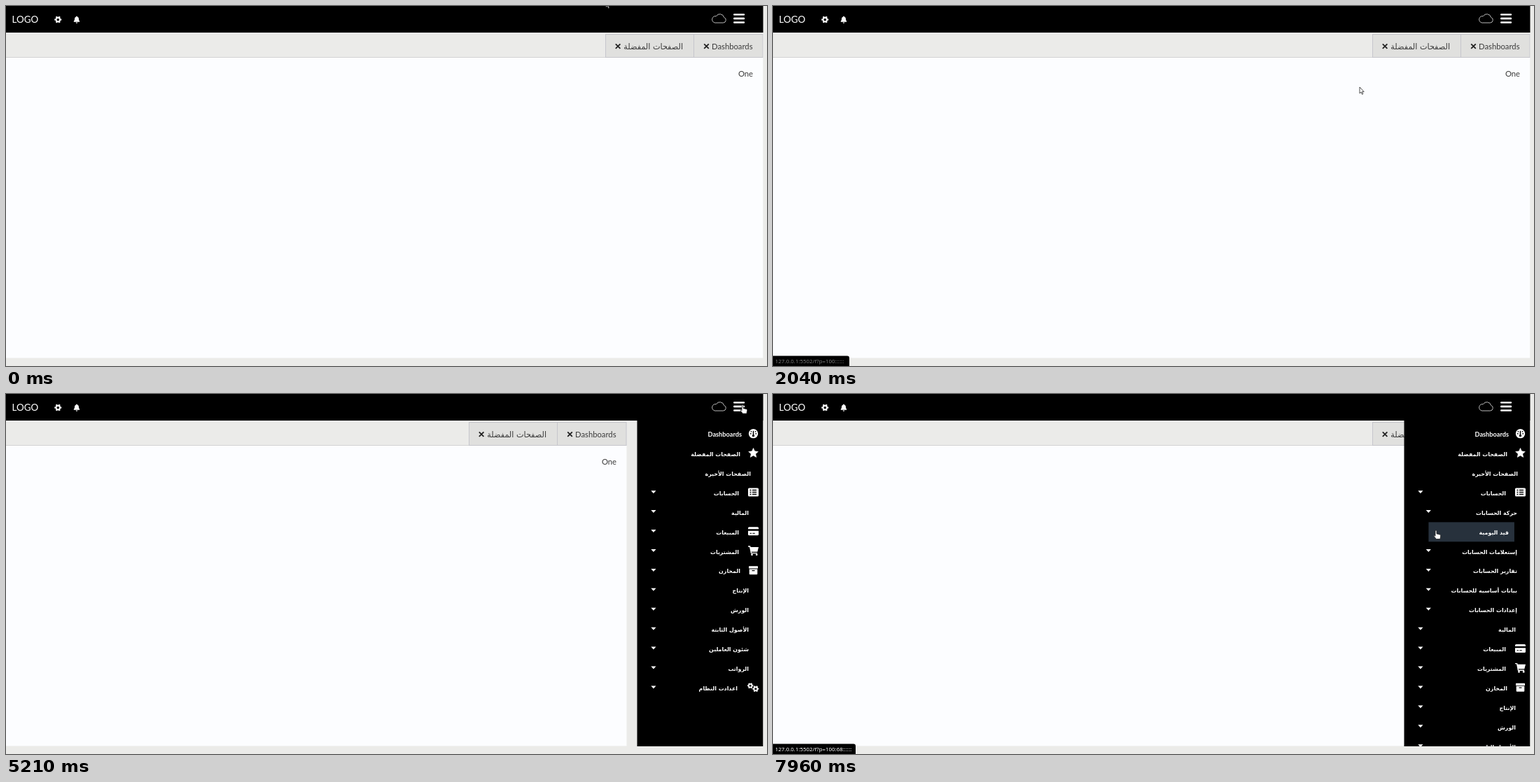
These frames come from a looping animation (1087 px wide and 515 px high, 8000 ms). An HTML page:

```html
<!DOCTYPE html>
<html lang="ar">
<head>
<meta charset="utf-8">
<style>
  html, body { margin: 0; width: 100%; height: 100%; overflow: hidden; background: #ebebe9; }
  svg { display: block; width: 100vw; height: 100vh; }
  text { font: 11.25px Lato, "Open Sans", sans-serif; white-space: pre; }
  .rtl { direction: rtl; text-anchor: start; }
  .ar { font: 11.2px "DejaVu Sans", sans-serif; }
  .page text { fill: #3c3c3c; }
  .menu text { font-size: 9.2px; font-weight: 700; fill: #fff; }
  .menu text.ar { font-size: 7.9px; }
  #status text { font: 7.9px "Noto Sans", sans-serif; fill: #fff; }
  .tab { fill: #e0e0de; stroke: #c6c6cc; }
  .close { stroke: #222; stroke-width: 1.8; }
  .line { fill: none; stroke: #fff; }
</style>
</head>
<body>
<svg viewBox="0 0 1087 515">
  <defs>
    <clipPath id="menuClip"><rect x="901.5" y="38" width="180" height="466"/></clipPath>
    <clipPath id="subClip"><rect id="subBox" x="901" width="181"/></clipPath>
    <clipPath id="childClip"><rect id="childBox" x="901" width="181"/></clipPath>
  </defs>
  <rect width="1087" height="515" fill="#ebebe9"/>

  <g id="page" class="page">
    <rect y="73" width="1081.5" height="430.5" fill="#fcfdff"/>
    <path d="M0 73.5H1081.5" stroke="#d3d3d3"/>
    <rect class="tab" x="856.5" y="40.5" width="126" height="33"/>
    <rect class="tab" x="982.5" y="40.5" width="98.5" height="33"/>
    <path class="close" d="M870.8 54.3l6.6 6.6m0-6.6l-6.6 6.6M997.2 54.3l6.6 6.6m0-6.6l-6.6 6.6"/>
    <text class="rtl ar" x="967" y="61.5">الصفحات المفضلة</text>
    <text class="rtl" x="1066.5" y="62">Dashboards</text>
    <text class="rtl" x="1067" y="101">One</text>
  </g>

  <g clip-path="url(#menuClip)">
    <g id="menu" class="menu">
      <rect x="901" y="38" width="181" height="466"/>
      <rect id="hover" fill="#27313c"/>
      <g id="upper"></g>
      <g clip-path="url(#subClip)">
        <g id="subFirst"></g>
        <g clip-path="url(#childClip)"><g id="child"></g></g>
        <g id="subRest"></g>
      </g>
      <g id="lower"></g>
    </g>
  </g>

  <rect x="1081.5" width="5.5" height="515" fill="#ebebe9"/>
  <rect width="1081.5" height="38"/>
  <text x="8.5" y="24" fill="#fff" style="font-size:13.4px">LOGO</text>
  <g id="gear"></g>
  <path transform="translate(101 19.5)" fill="#fff" d="M0-5c-.6 0-.9.4-.9.9C-2.8-3.6-3-1.8-3-.5-3 1-4 1.8-4.3 2.5-4.4 3-4 3.3-3.6 3.3H3.6C4 3.3 4.4 3 4.3 2.5 4 1.8 3 1 3-.5 3-1.8 2.8-3.6.9-4.1.9-4.6.6-5 0-5zM-1.3 4H1.3A1.3 1.3 0 0 1-1.3 4z"/>
  <path class="line" style="stroke:#bbb" d="M1012.5 24H1024.5A4 4 0 0 0 1025.5 16.2A6 6 0 0 0 1014.5 14.5A4.8 4.8 0 0 0 1012.5 24z"/>
  <path class="line" stroke-width="2.6" stroke-linecap="round" d="M1040.3 12.3h13.6M1040.3 17.9h13.6M1040.3 23.5h13.6"/>

  <g id="status">
    <path id="statusBox"/>
    <text id="statusText" x="3" y="511"></text>
  </g>
  <path id="cursor" fill="#fff" stroke="#222" stroke-width=".8" stroke-linejoin="round"/>
</svg>

<script>
const LOOP = 8000, ROW = 27.93, TOP = 43.7;
const $ = id => document.getElementById(id);

const gear = (x, y, r) => `<g class="line" transform="translate(${x} ${y})">
  <circle r="${r * .57}" stroke-width="${r * .42}"/>
  <circle r="${r * .86}" stroke-width="${r * .3}" pathLength="12" stroke-dasharray="1" stroke-dashoffset=".5"/></g>`;

const star = Array.from({ length: 10 }, (_, i) => {
  const r = i % 2 ? 3.4 : 7.2, a = i * Math.PI / 5;
  return [r * Math.sin(a), -r * Math.cos(a)].map(v => v.toFixed(2));
}).join(' ');

// Icons are drawn around their own centre.
const icons = {
  gauge: '<circle r="6.7"/><path stroke="#000" stroke-width="1.5" d="M0 3V-4M-4.5 0h1.5M3 0h1.5M-3.6-3.4l1 1M3.6-3.4l-1 1"/><circle cy="3" r="1.7" fill="#000"/>',
  star: `<polygon points="${star}" stroke="#fff" stroke-width=".6" stroke-linejoin="round"/>`,
  list: '<rect x="-7.5" y="-6" width="15" height="12" rx="1.5"/><path stroke="#000" stroke-width="1.4" d="M-5-3h2m1.5 0h6M-5 0h2m1.5 0h6M-5 3h2m1.5 0h6"/>',
  card: '<rect x="-7.5" y="-6" width="15" height="12" rx="1.5"/><path stroke="#000" d="M-7.5-1.8h15" stroke-width="2.4"/><path stroke="#000" d="M-5 3h2.5m1.3 0h3.5"/>',
  cart: '<path d="M-4.8-5.2H7.5L5.8 1.4H-3.4z"/><path class="line" stroke-width="1.4" d="M-7.5-6.2h2.6L-3 3.4h8.6"/><circle cx="-2" cy="5.6" r="1.4"/><circle cx="4.7" cy="5.6" r="1.4"/>',
  box: '<rect x="-6.5" y="-6" width="13" height="3.4" rx=".6"/><path d="M-5.8-1.8H5.8V5q0 1-1 1H-4.8q-1 0-1-1z"/><path stroke="#000" stroke-width="1.2" d="M-2 .4h4"/>',
  gears: gear(-4.3, -2.5, 4.2) + gear(3.3, 2, 4.5)
};

const main = [
  ['Dashboards', 1051, 'gauge'], ['الصفحات المفضلة', 1049, 'star'], ['الصفحات الأخيرة', 1064],
  ['الحسابات', 1047, 'list', 1], ['المالية', 1061, '', 1], ['المبيعات', 1047, 'card', 1],
  ['المشتريات', 1047, 'cart', 1], ['المخازن', 1049, 'box', 1], ['الإنتاج', 1061, '', 1],
  ['الورش', 1061, '', 1], ['الأصول الثابتة', 1061, '', 1], ['شئون العاملين', 1061, '', 1],
  ['الرواتب', 1061, '', 1], ['اعدادت النظام', 1045, 'gears', 1]
];
const sub = ['حركة الحسابات', 'إستعلامات الحسابات', 'تقارير الحسابات', 'بيانات أساسيه للحسابات', 'إعدادات الحسابات']
  .map(s => [s, 1063, '', 1]);

const rowTop = i => TOP + i * ROW;

function row([label, right, icon, caret], index, depth = 0) {
  const y = rowTop(index) + ROW / 2;
  const script = label === 'Dashboards' ? '' : ' ar';
  return `<text class="rtl${script}" x="${right}" y="${y + 3.3}">${label}</text>` +
    (icon ? `<g fill="#fff" transform="translate(1067.5 ${y - 1})">${icons[icon]}</g>` : '') +
    (caret ? `<path fill="#fff" d="M${921.3 + 11.4 * depth} ${y - 3.3}h7.2l-3.6 4z"/>` : '');
}
const rows = (list, start, depth) => list.map((r, i) => row(r, start + i, depth)).join('');

$('upper').innerHTML = rows(main.slice(0, 4), 0);
$('lower').innerHTML = rows(main.slice(4), 4);
$('subFirst').innerHTML = rows(sub.slice(0, 1), 4, 1);
$('subRest').innerHTML = rows(sub.slice(1), 5, 1);
$('child').innerHTML = row(['قيد اليومية', 1051], 5, 2);
$('gear').innerHTML = gear(74.3, 19.5, 5);

const openTrack = [[560, 0], [700, 1], [1880, 1], [2000, 0], [3940, 0], [4080, 1], [4660, 1], [4790, 0], [5209, 0], [5210, 1]];
const pinTrack = [[3940, 0], [4080, 1], [4660, 1], [4790, 0], [5209, 0], [5210, 1], [5540, 1], [5680, 0]];
const statusTrack = [[1330, 0], [1430, 1], [1990, 1], [2090, 0], [6130, 0], [6230, 1]];
const path = [
  [130, 857, -7], [520, 1010, 32], [920, 1042, 66], [1080, 1042, 66], [1340, 1018, 141.5], [1520, 1018, 141.5],
  [1700, 965, 118], [1880, 900, 116], [2040, 838, 116], [2300, 815, 112], [2710, 930, 52], [3210, 1060, 24],
  [3380, 1060, 24], [3600, 1051, 16], [5300, 1051, 16], [5600, 1058, 46], [6000, 1042, 72],
  [6340, 919, 140.5], [6880, 919, 140.5], [7130, 938, 165], [7710, 938, 165], [7930, 946, 195.5]
];
const links = [[0, 'index.html#'], [1640, 'f?p=100::::::'], [3000, 'index.html#'], [7790, 'f?p=100:68::::::']];

const clamp = v => Math.min(1, Math.max(0, v));
const smooth = v => v * v * (3 - 2 * v);
const collapse = (t, start) => 1 - (1 - clamp((t - start) / 350)) ** 2.25;

function at(track, t, column = 1) {
  const next = track.findIndex(k => k[0] > t);
  if (next === 0) return track[0][column];
  if (next < 0) return track[track.length - 1][column];
  const a = track[next - 1], b = track[next];
  return a[column] + (b[column] - a[column]) * smooth((t - a[0]) / (b[0] - a[0]));
}

const ARROW = 'M0 0V9L2 7.2 3.5 10.4 4.8 9.8 3.4 6.7H6.2z';
const HAND = 'M0 .5a1 1 0 0 1 2 0V4.4l4.8 1.3q1.1.3.9 1.7L6.9 12H1.4L-2 7.8q-.5-1.2.9-1L0 7.8z';

function set(id, attrs) {
  for (const name in attrs) $(id).setAttribute(name, attrs[name]);
}

// Returns the hovered row as its top edge and depth.
function findHover(x, y, subHeight, childHeight) {
  const start = rowTop(4), snap = (v, origin) => origin + Math.floor((v - origin) / ROW) * ROW;
  if (x < 914 || x > 1081 || y < TOP) return null;
  if (y < start) return { top: snap(y, TOP), depth: 0 };
  if (y >= start + subHeight) return { top: snap(y, start + subHeight), depth: 0 };
  if (y < start + ROW) return { top: start, depth: 1 };
  if (y < start + ROW + childHeight) return { top: start + ROW, depth: 2 };
  return { top: snap(y, start + ROW + childHeight), depth: 1 };
}

function render(t) {
  const open = at(openTrack, t), x = at(path, t, 1), y = at(path, t, 2);
  const childHeight = ROW * collapse(t, 7290);
  const subHeight = 5 * ROW * collapse(t, 6430) + childHeight;

  set('page', { transform: `translate(${-195 * at(pinTrack, t)} 0)` });
  set('menu', { transform: `translate(${181 * (1 - open)} 0)` });
  set('lower', { transform: `translate(0 ${subHeight})` });
  set('subRest', { transform: `translate(0 ${childHeight})` });
  set('subBox', { y: rowTop(4), height: subHeight });
  set('childBox', { y: rowTop(5), height: childHeight });

  const hover = open > .9 ? findHover(x, y, subHeight, childHeight) : null;
  const depth = hover ? hover.depth : 0;
  set('hover', {
    x: 914 + 11.2 * depth, width: 167.5 - 22.5 * depth,
    y: hover ? hover.top : 0, height: hover ? ROW : 0
  });

  const onToggle = x > 1038 && x < 1056 && y > 9 && y < 27;
  set('cursor', { d: hover || onToggle ? HAND : ARROW, transform: `translate(${x} ${y})` });

  const alpha = at(statusTrack, t);
  const link = links.filter(l => l[0] <= t).pop()[1];
  set('status', { opacity: clamp(alpha * 3) });
  set('statusText', { opacity: alpha });
  set('statusBox', { d: `M0 500.5H${link.includes(':68') ? 115 : 106}q3 0 3 3V515H0z` });
  $('statusText').textContent = '127.0.0.1:5502/' + link;
}

const began = performance.now();
function frame() {
  render((performance.now() - began) % LOOP);
  requestAnimationFrame(frame);
}
frame();
</script>
</body>
</html>
```
